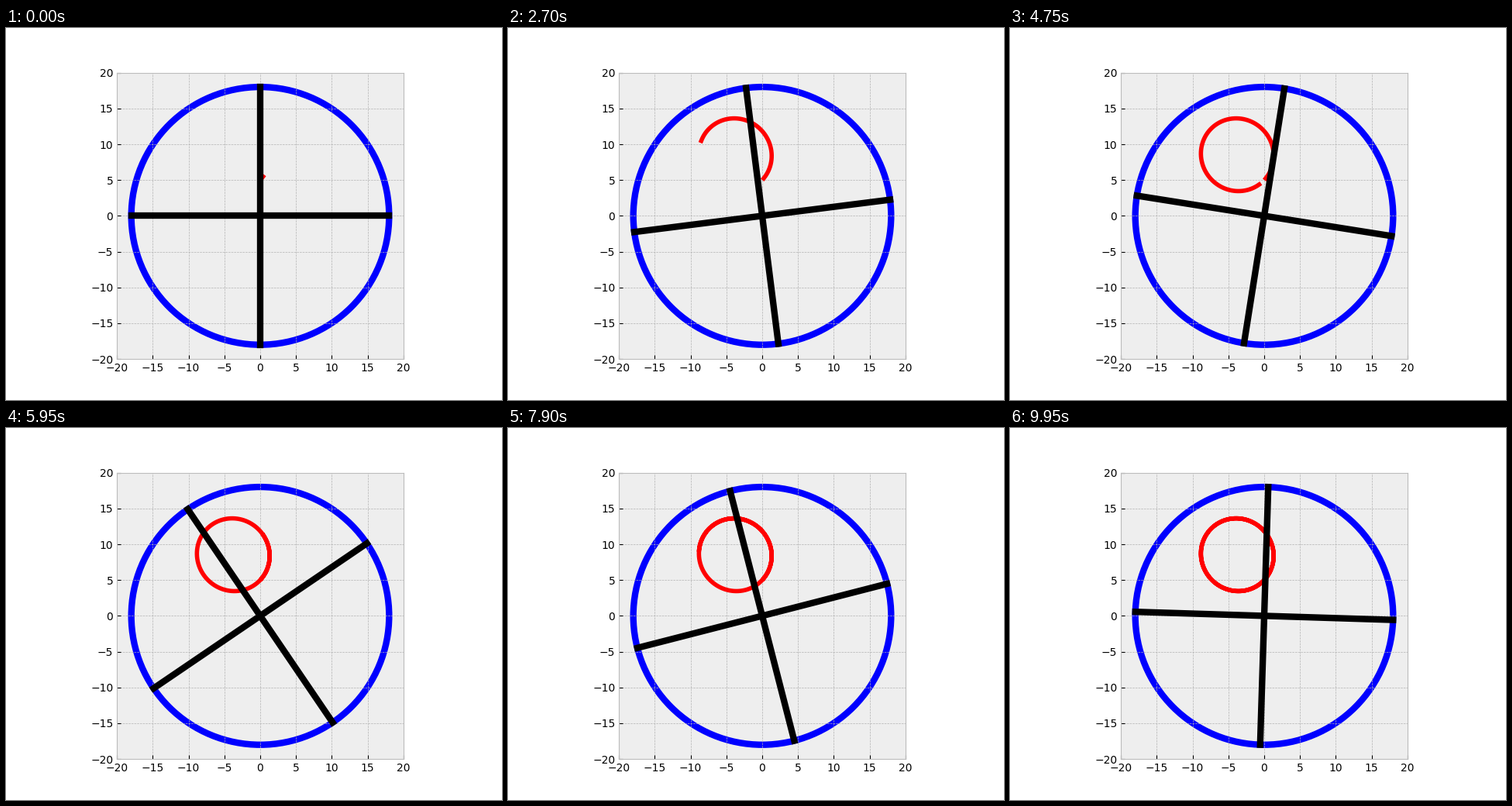
Animation, 640 px wide and 480 px high, one loop 10000 ms. Source, as a matplotlib script:

```python
import numpy as np
import matplotlib.pyplot as plt
from matplotlib.animation import FuncAnimation

FRAMES = 200
INTERVAL = 50
RADIUS = 18
OMEGA = 1.0
DT = 2 * np.pi / (OMEGA * FRAMES)


def inertial_path(steps, pos=(0.0, 5.0), speed=10.0):
    """Path of a puck under the Coriolis force, semi-implicit Euler."""
    x, y = pos
    vx = vy = speed / np.sqrt(2)
    points = []
    for _ in range(steps):
        vy += 2 * OMEGA * vx * DT
        vx -= 2 * OMEGA * vy * DT
        x += vx * DT
        y += vy * DT
        points.append((x, y))
    return np.array(points)


plt.style.use("bmh")
plt.rcParams["font.family"] = "DejaVu Sans"

fig, ax = plt.subplots(figsize=(6.4, 4.8), dpi=100)
fig.set_facecolor("white")
ax.set_aspect("equal")
ax.set(xlim=(-20, 20), ylim=(-20, 20))
ticks = np.arange(-20, 21, 5)
ax.set_xticks(ticks)
ax.set_yticks(ticks)

ax.add_patch(plt.Circle((0, 0), RADIUS, fill=False, ec="blue", lw=6))
trail, = ax.plot([], [], color="red", lw=4)
spokes = [ax.plot([], [], color="black", lw=6)[0] for _ in range(2)]

path = inertial_path(FRAMES + 1)


def update(i):
    # The trail always holds at least one segment.
    trail.set_data(path[:i + 2, 0], path[:i + 2, 1])
    for k, spoke in enumerate(spokes):
        angle = OMEGA * DT * i + k * np.pi / 2
        ends = RADIUS * np.array([-1, 1])
        spoke.set_data(ends * np.cos(angle), ends * np.sin(angle))
    return [trail, *spokes]


anim = FuncAnimation(fig, update, frames=FRAMES, interval=INTERVAL,
                     repeat=True, repeat_delay=0, blit=False)
plt.show()
```
